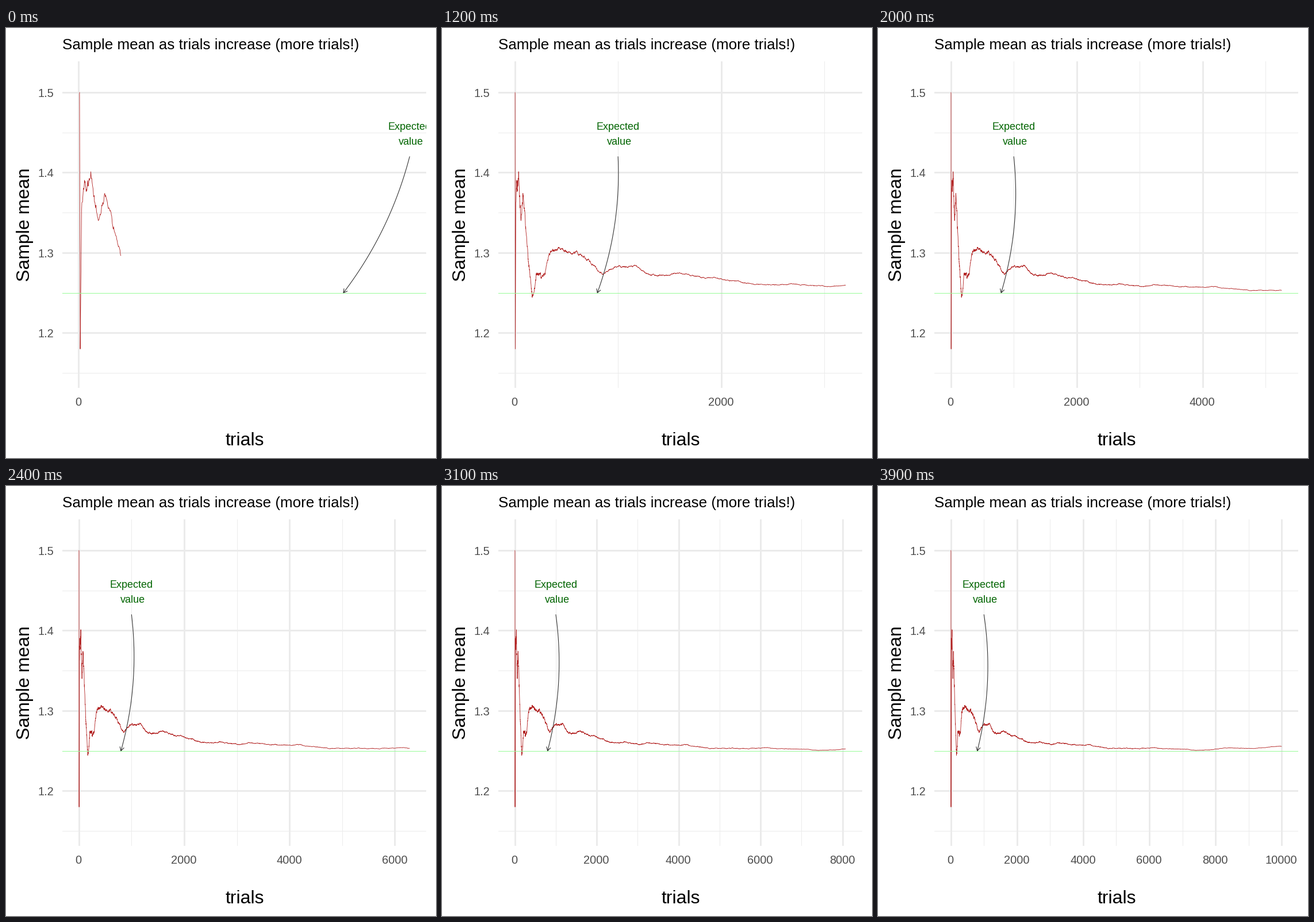
These frames come from a looping animation (748x748 px, 5000 ms). A matplotlib script:

```python
import numpy as np
import matplotlib.pyplot as plt
from matplotlib.animation import FuncAnimation
from matplotlib.patches import Rectangle

SIZE = 748
LEFT, RIGHT, TOP, BOTTOM = 98, 731, 58, 626
FRAMES, INTERVAL = 50, 100
TRIALS = 10000
STEP = TRIALS / 39
GRID, TICK_TEXT, NOTE = "#EBEBEB", "#4D4D4D", "#006400"

plt.rcParams["font.family"] = ["Liberation Sans"]

# Main swings of the running mean: (trial, mean)
SWINGS = [
    (3, 1.5), (5, 1.18), (9, 1.35), (37, 1.401), (61, 1.341), (79, 1.374),
    (119, 1.31), (168, 1.246), (229, 1.274), (295, 1.275), (332, 1.299),
    (596, 1.302), (819, 1.276), (1184, 1.283), (1311, 1.272), (1717, 1.272),
    (2307, 1.261), (5182, 1.253), (7300, 1.251), (10000, 1.2555),
]


def running_mean():
    """Join the swings with a random walk whose steps shrink like 1/n."""
    swing_n, swing_mean = np.transpose(SWINGS)
    n = np.arange(3, TRIALS + 1)
    rng = np.random.default_rng(7)
    walk = np.cumsum(rng.normal(size=n.size) * 0.25 / (n + 30))
    pinned = np.interp(n, swing_n, np.interp(swing_n, n, walk))
    return n, np.interp(n, swing_n, swing_mean) + walk - pinned


def y_pixel(value):
    unit = (BOTTOM - TOP) / 1.1 / 0.37
    return TOP + (BOTTOM - TOP) * 0.05 / 1.1 + (1.52 - value) * unit


def x_pixel(trial, last):
    width = (RIGHT - LEFT) / 1.1
    return LEFT + 0.05 * width + (trial - 1) / (last - 1) * width


def arrow_path(start, tip, bend=0.05, head=7.6):
    """A shallow curve to the tip, followed by the two open head strokes."""
    chord = tip - start
    normal = np.array([chord[1], -chord[0]])
    t = np.linspace(0, 1, 30)[:, None]
    curve = start + t * chord + 4 * bend * t * (1 - t) * normal
    back = 4 * bend * normal - chord
    angle = np.arctan2(back[1], back[0])
    wings = [tip + head * np.array([np.cos(a), np.sin(a)])
             for a in (angle - np.pi / 6, angle + np.pi / 6)]
    return np.vstack([curve, [[np.nan, np.nan]], [wings[0], tip, wings[1]]])


# At 72 dpi one point is one pixel.
fig = plt.figure(figsize=(SIZE / 72, SIZE / 72), dpi=72, facecolor="white")
ax = fig.add_axes([0, 0, 1, 1])
ax.set(xlim=(0, SIZE), ylim=(SIZE, 0))
ax.axis("off")
# Built upwards from the bottom edge, as the y axis points down.
panel = Rectangle((LEFT, BOTTOM), RIGHT - LEFT, TOP - BOTTOM,
                  fill=False, lw=0)
ax.add_patch(panel)


def stroke(x, y, color, width, z, smooth=False):
    line, = ax.plot(x, y, color=color, lw=width, zorder=z, antialiased=smooth,
                    solid_capstyle="butt")
    line.set_clip_path(panel)
    return line


def label(x, y, text, size, color="black", ha="center", **kwargs):
    return ax.text(x, y, text, size=size, color=color, ha=ha, va="baseline",
                   **kwargs)


def horizontal(value, color, width, z):
    return stroke([LEFT, RIGHT], [y_pixel(value)] * 2, color, width, z)


def vertical(width, z):
    return stroke([0, 0], [TOP, BOTTOM], GRID, width, z)


for value in np.arange(1.15, 1.5, 0.1):
    horizontal(value, GRID, 1, 1)
for value in np.arange(1.2, 1.55, 0.1):
    horizontal(value, GRID, 3, 2)
    label(83, y_pixel(value) + 8, f"{value:.1f}", 20, TICK_TEXT, "right")

majors = {b: (vertical(3, 2), label(0, 657, str(b), 20, TICK_TEXT))
          for b in range(0, TRIALS + 1, 2000)}
minors = {b: vertical(1, 1) for b in range(1000, TRIALS, 2000)}

label(98, 36.5, "Sample mean as trials increase (more trials!)", 26, ha="left")
label(415, 726, "trials", 32)
label(41, 342.5, "Sample mean", 32, rotation=90, rotation_mode="anchor")

trials, means = running_mean()
mean_pixels = y_pixel(means)
mean_line = stroke([], [], "#B22222", 0.85, 3, smooth=True)
horizontal(1.25, "#98FB98", 1, 4)
arrow = stroke([], [], "#333333", 1.1, 5, smooth=True)
notes = [(label(0, 177, "Expected", 18, NOTE, clip_on=True), 0),
         (label(0, 203, "value", 18, NOTE, clip_on=True), 2.5)]
for note, _ in notes:
    note.set_clip_path(panel)


def update(frame):
    count = min(TRIALS, STEP * (frame + 0.5))
    last = max(1000, count)
    edge = last + 0.05 * (last - 1)

    for value, (line, text) in majors.items():
        x = x_pixel(value, last)
        line.set_xdata([x, x])
        text.set_x(x - 0.5)
        line.set_visible(value <= edge)
        text.set_visible(value <= edge)
    for value, line in minors.items():
        x = x_pixel(value, last)
        line.set_xdata([x, x])
        # Minor lines need at least two major ones.
        line.set_visible(edge >= 2000 and value <= edge)

    shown = trials <= count
    mean_line.set_data(x_pixel(trials[shown], last), mean_pixels[shown])

    start = np.array([x_pixel(1000, last), y_pixel(1.42)])
    tip = np.array([x_pixel(800, last), y_pixel(1.25)])
    arrow.set_data(*arrow_path(start, tip).T)
    for note, shift in notes:
        note.set_x(start[0] + shift)


anim = FuncAnimation(fig, update, frames=FRAMES, interval=INTERVAL,
                     init_func=lambda: update(0), repeat=True, repeat_delay=0,
                     blit=False)
plt.show()
```
